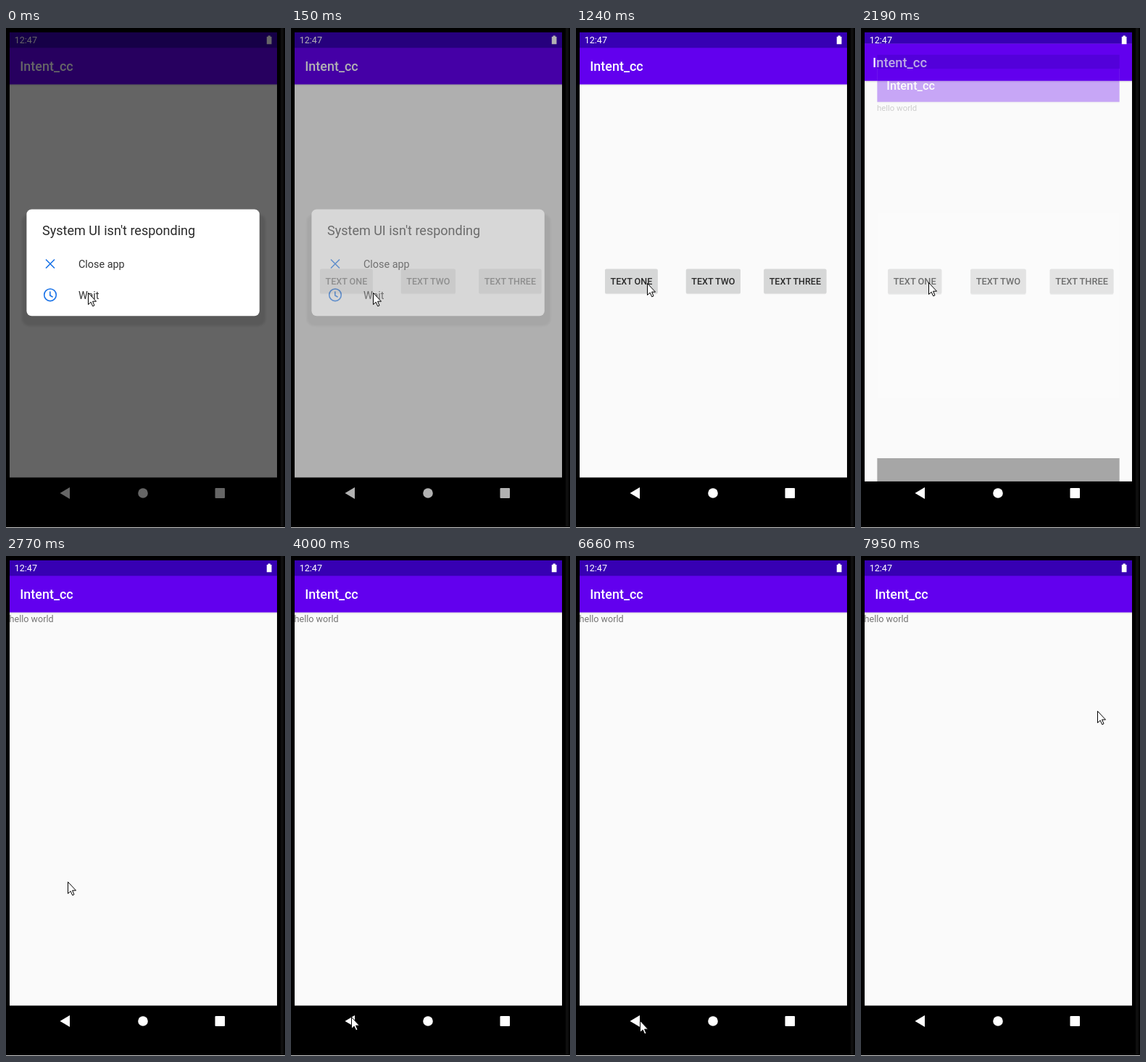
An HTML page for the animation above (8 s loop, 385 by 688 pixels).

```html
<!DOCTYPE html>
<html lang="en">
<head>
<meta charset="utf-8">
<title>Opening a second screen</title>
<style>
  html, body { margin: 0; width: 100%; height: 100%; overflow: hidden; background: #000; }
  svg { display: block; width: 385px; height: 688px; font: 12.57px Roboto, sans-serif; }
  .title { font-size: 17.96px; font-weight: 500; fill: #fff; }
  .button rect { fill: #d6d7d7; }
  .button .shadow { fill: #000; opacity: .08; }
  .button text { font-weight: 500; fill: #2a2a2a; text-anchor: middle; }
  .page { transform-origin: 189.5px 334px; }
  .dialog-title { font-size: 18px; fill: #2a2a2a; }
  .item { font-size: 14.4px; fill: #333; }
  .icon { fill: none; stroke: #1a73e8; stroke-width: 1.6; }
</style>
</head>
<body>
<svg viewBox="0 0 385 688">
  <defs>
    <clipPath id="screen"><rect x="5" y="6" width="369" height="676"/></clipPath>
    <filter id="soft"><feGaussianBlur stdDeviation="1.5"/></filter>
    <g id="frame">
      <rect x="5" y="618.5" width="369" height="64"/>
      <rect x="5" y="27" width="369" height="591.5" fill="#fafafa"/>
      <rect x="5" y="77" width="369" height="2.5" opacity=".07"/>
      <rect x="5" y="27" width="369" height="50.6" fill="#6200ee"/>
      <rect x="5" y="6" width="369" height="21.3" fill="#3700b3"/>
      <text class="title" x="19.3" y="59.3">Intent_cc</text>
    </g>
  </defs>

  <rect width="385" height="688"/>
  <rect x="379" width="4" height="687" fill="#0e0e0e"/>
  <rect y="687" width="385" height="1" fill="#c8c8c8"/>

  <g clip-path="url(#screen)">
    <g id="home" class="page"><use href="#frame"/></g>
    <g id="hello" class="page">
      <use href="#frame"/>
      <text x="4.6" y="91" fill="#757575">hello world</text>
    </g>
  </g>

  <g fill="#fff">
    <text x="11.7" y="21.3">12:47</text>
    <path d="M361.5 10.5H364.8V12H366.5V22.2H359.8V12H361.5Z"/>
    <path d="M74.5 640L88 632V648Z"/>
    <circle cx="189" cy="640" r="6.8"/>
    <rect x="288.5" y="633" width="13.5" height="14" rx="1"/>
  </g>

  <rect id="dim" x="5" y="6" width="369" height="676"/>
  <g id="dialog">
    <rect x="22" y="256" width="336" height="154" rx="10" opacity=".1" filter="url(#soft)"/>
    <rect x="28.4" y="249.4" width="321.4" height="146.8" rx="7" fill="#fff"/>
    <text class="dialog-title" x="50" y="284.5">System UI isn't responding</text>
    <path class="icon" d="M55 318.5L67 330.5M67 318.5L55 330.5"/>
    <text class="item" x="100" y="330">Close app</text>
    <circle class="icon" cx="61" cy="367.3" r="8.3"/>
    <path class="icon" d="M60.8 362.5V368L64.6 370.2"/>
    <text class="item" x="100" y="373">Wait</text>
  </g>

  <path id="cursor" d="M.5 -.5v16l3.7 -3.3 2.5 5.6 2.3 -1 -2.4 -5.6h4.9Z" fill="#fff" stroke="#000"/>
</svg>
<script>
  const $ = id => document.getElementById(id);
  const LOOP = 8000, REFRESH = 135;

  // Pointer glides, each from wherever the last one ended
  const start = { x: 113, y: 365 };
  const glides = [
    { from: 130, to: 270, x: 115, y: 336 },    // dialog dismissed
    { from: 600, to: 1215, x: 98, y: 352 },    // onto the first button
    { from: 1350, to: 1660, x: 93, y: 351 },
    { from: 2400, to: 3460, x: 72, y: 619 },   // down to the back key
    { from: 3500, to: 4000, x: 83, y: 635 },
    { from: 4700, to: 5200, x: 103, y: 559 },
    { from: 5200, to: 5710, x: 85, y: 640 },
    { from: 6500, to: 6615, x: 88, y: 640 },
    { from: 6615, to: 7500, x: 341, y: 275 },  // away over the page
    { from: 7500, to: 7950, x: 326, y: 214 }
  ];

  function pointer(t) {
    let { x, y } = start;
    for (const g of glides) {
      const k = Math.min(1, Math.max(0, (t - g.from) / (g.to - g.from)));
      const ease = k * k * (3 - 2 * k);
      x += (g.x - x) * ease;
      y += (g.y - y) * ease;
    }
    return [Math.round(x), Math.round(y)];
  }

  // Evenly spaced buttons, each as wide as its label plus padding
  ["ONE", "TWO", "THREE"].forEach((name, i) => {
    const x = 76.4 + 113 * i;
    $("home").insertAdjacentHTML("beforeend", `<g class="button">
      <rect class="shadow" y="332" height="34.3"/><rect y="331.6" height="33.6"/>
      <text x="${x}" y="352.9">TEXT ${name}</text></g>`);
    const button = $("home").lastElementChild;
    const width = button.querySelector("text").getComputedTextLength() + 15;
    for (const box of button.querySelectorAll("rect")) {
      box.setAttribute("x", x - width / 2);
      box.setAttribute("width", width);
      box.setAttribute("rx", 2);
    }
  });

  function pose(id, opacity, scale) {
    $(id).style.opacity = opacity;
    $(id).style.transform = `scale(${scale})`;
  }

  function draw(now) {
    const t = now % LOOP;
    const shade = t < 150 ? 1 : t < 270 ? .5 : 0;
    const opening = t >= 2190 && t < 2500;

    pose("home", 1, opening ? 1.019 : 1);
    pose("hello", opening ? .33 : t < 2500 ? 0 : 1, opening ? .906 : 1);
    $("dim").style.opacity = .6 * shade;
    $("dialog").style.opacity = shade;

    const [x, y] = pointer(Math.round(t / REFRESH) * REFRESH);
    $("cursor").setAttribute("transform", `translate(${x} ${y})`);
    requestAnimationFrame(draw);
  }
  requestAnimationFrame(draw);
</script>
</body>
</html>
```
